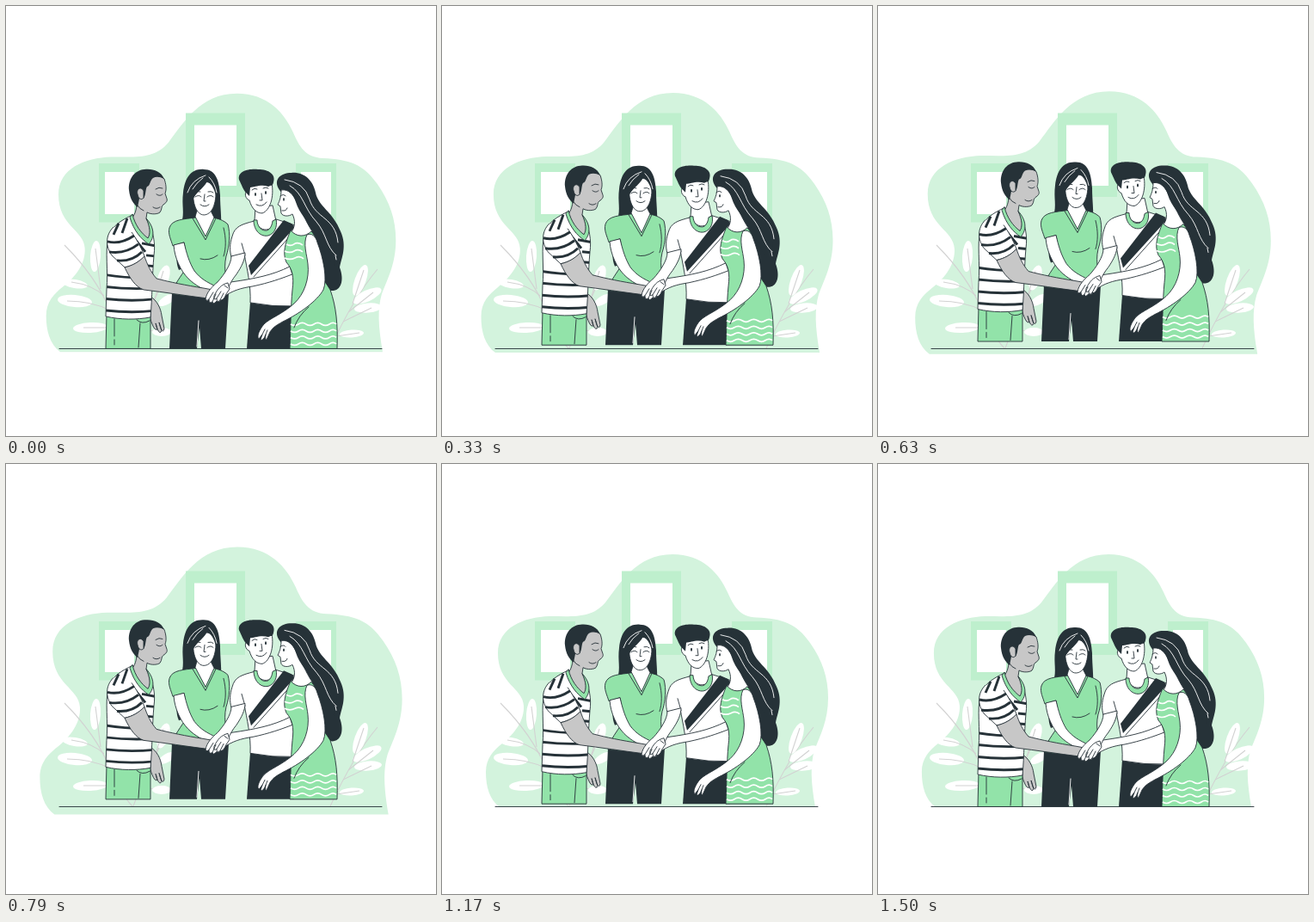
An HTML page that plays this animation: 500 px wide and 500 px high, repeating every 1.54 s.

```html
<!DOCTYPE html>
<html lang="en">
<head>
<meta charset="utf-8">
<title>Team hands together</title>
<style>
  html, body { margin: 0; height: 100%; overflow: hidden; background: #fff; }
  svg { display: block; width: 100vw; height: 100vh; }
  .line { fill: none; stroke: #263238; stroke-width: .9; stroke-linecap: round; stroke-linejoin: round; }
  .ink { fill: #263238; }
  .green { fill: #92e3a9; }
  .skin { fill: #fff; }
  .grey { fill: #c7c7c7; }
  .green, .skin, .grey { stroke: #263238; stroke-width: .9; stroke-linejoin: round; }
  .shine { fill: none; stroke: #fff; stroke-width: .9; stroke-linecap: round; }
  .wave { fill: none; stroke: #fff; stroke-width: 1.7; }
  .stripe { fill: none; stroke: #263238; stroke-width: 2.9; }
  .stem { fill: none; stroke: #d2d2d2; stroke-width: 1.1; }
</style>
</head>
<body>
<svg viewBox="0 0 500 500">
  <defs>
    <clipPath id="shirt"><path id="torso" d="M147 243C135 249 123 255 119 269C115 285 119 308 117 330L116 361C133 365 152 365 168 362C170 340 170 312 172 290C174 276 171 262 166 254Z"/></clipPath>
    <path id="ripple" d="M331 0q4.500 3 9 0t9 0t9 0t9 0t9 0t8 0"/>
  </defs>

  <path id="blob" fill="#d3f3dd" d="M67 399C55 390 51 375 51 358C51 342 60 333 70 325C85 313 96 298 95 281C94 260 65 256 65 220C65 190 95 178 125 177C152 177 174 180 190 161C207 139 226 105 268 105C303 105 322 127 332 149C339 165 346 178 366 178.500C396 180 412 185 428 208C442 228 449 248 449 272C449 298 440 315 433 333C428 350 429 370 434 399Z"/>

  <g fill="#fff">
    <path fill="#beefcd" d="M209 124.500H278V222H209ZM108 183H155V251.500H108ZM337 183H384V251.500H337Z"/>
    <path d="M219 138.500H268V209H219ZM115 193H149V242H115ZM343 193H378V242H343Z"/>
  </g>

  <g id="plants">
    <path class="stem" d="M68 278C92 302 109 325 121 354C130 374 139 390 147 398M148 398C157 372 170 350 183 318M158 376L182 379M432 306C411 331 394 361 377 398"/>
    <g fill="#fff">
      <ellipse cx="104" cy="291" rx="6" ry="18" transform="rotate(4 104 291)"/>
      <ellipse cx="126" cy="306" rx="5.500" ry="17" transform="rotate(13 126 306)"/>
      <ellipse cx="80" cy="323" rx="15" ry="5" transform="rotate(10 80 323)"/>
      <ellipse cx="80" cy="343" rx="20" ry="7" transform="rotate(5 80 343)"/>
      <ellipse cx="98" cy="374" rx="20" ry="6" transform="rotate(-3 98 374)"/>
      <ellipse cx="183" cy="316" rx="6.500" ry="15" transform="rotate(18 183 316)"/>
      <ellipse cx="187" cy="342" rx="11" ry="5" transform="rotate(-30 187 342)"/>
      <ellipse cx="181" cy="379" rx="11" ry="5"/>
      <ellipse cx="412" cy="319" rx="6.500" ry="19" transform="rotate(20 412 319)"/>
      <ellipse cx="420" cy="337" rx="18" ry="6.500" transform="rotate(-25 420 337)"/>
      <ellipse cx="421" cy="351" rx="16" ry="5.500" transform="rotate(-5 421 351)"/>
      <ellipse cx="402" cy="381" rx="14" ry="4.500" transform="rotate(-4 402 381)"/>
    </g>
    <path class="stem" d="M104 282L110 329M126 296L119 349M76 321Q100 324 114 337M71 343Q100 343 121 354M90 374L131 374M183 308L170 350M416 307L403 346M427 333L398 356M425 351L392 367M411 380L384 384"/>
  </g>

  <path class="line" d="M62 398.500H437"/>

  <g id="people">
    <g id="woman-centre">
      <path class="ink" d="M230 190C215 189 208 200 206 217C204 232 208 240 204 253C204 275 194 290 201 307L213 302L250 262C251 245 249 235 249 220C248 203 244 190 230 190Z"/>
      <path class="ink" d="M193 333L190 398.500H222L225 374L227 398.500H255L259 333Z"/>
      <path class="shine" d="M224 366L222 396"/>
      <path class="green" d="M221 246C207 248 193 248 190 258C188 265 192 272 194 279L207 275C210 288 209 298 208 307C200 319 194 327 193 335Q225 340 258 335C258 320 252 308 256 291C260 279 261 265 258 254C253 249 246 247 240 246Z"/>
      <path class="skin" d="M220 245L232 268L242 246L238 238H222Z"/>
      <path class="line" d="M217 247L232 272L244 247M253 258C256 270 256 282 253 291M246 290Q236 297 226 294"/>
      <path class="skin" d="M218 212C216 230 222 243 230 243C239 243 245 231 244 212C240 202 222 202 218 212Z"/>
      <path class="ink" d="M245 229C244 213 239 207 234 204C228 214 221 216 217 226C211 209 219 193 231 193C243 193 250 210 245 229Z"/>
      <path class="shine" d="M232 197Q216 202 211 217M229 200Q221 206 217 213M236 199Q243 206 245 217"/>
      <path class="line" d="M220 222q4-3 7 0M234 222q4-3 7 0M231 219L230 227H232M226 231q5 4 10 0M220 217q4-2 6-1M235 216q4-1 6 1"/>
      <path class="skin" d="M195 278C196 293 203 308 212 317C220 325 230 330 240 334L246 327C233 321 226 317 219 308C213 298 210 288 207 275Z"/>
    </g>

    <g id="man-right">
      <path class="ink" d="M284 344L280 398.500H335L336 347Z"/>
      <path class="skin" d="M289 250C274 254 266 256 263 268C260 277 260 284 262 292L277 288C280 305 285 325 284 345Q310 350 336 349V255L314 248Z"/>
      <path class="ink" d="M323 249L332 253L336 257L285 313L282 302Z"/>
      <path class="line" d="M338 259L288 315M274 276L278 290"/>
      <path class="skin" d="M290 234L289 250C296 264 309 263 314 250L310 232Z"/>
      <path class="green" d="M288 249C288 262 297 269 305 267C312 265 316 257 314 248L310 250C309 258 305 262 301 261C296 261 292 255 292 249Z"/>
      <path class="skin" d="M282 215C277 214 277 224 283 226C286 236 291 241 298 241C307 238 312 222 309 206L285 204Z"/>
      <path class="ink" d="M271 202C269 192 282 189 293 190C306 190 314 196 311 205C310 210 308 208 305 210C297 207 288 211 284 211L283 221L279 217C276 214 274 208 271 202Z"/>
      <path class="line" d="M286 214q3-3 6-1M299 212q3-2 6 0M297 218L298 226H295M291 231Q298 235 303 228"/>
      <ellipse class="ink" cx="290" cy="219" rx="1" ry="2"/>
      <ellipse class="ink" cx="302" cy="217" rx="1" ry="2"/>
    </g>

    <g id="woman-right">
      <path class="ink" d="M318 214C310 202 319 194 332 194C347 193 357 203 360 217C363 233 380 239 389 262C397 280 390 293 388 304C394 320 389 332 378 331C369 330 366 315 360 300C350 280 350 260 338 240Z"/>
      <path class="skin" d="M320 214C320 222 318 227 316 231L319 233L320 241C322 245 329 245 333 242C337 250 336 258 331 264C338 275 352 273 356 262C348 250 345 240 339 230C334 219 329 213 320 214Z"/>
      <path class="ink" d="M317 212C322 208 333 214 337 228C341 241 351 251 359 261C366 275 369 288 382 302L386 270L357 225L346 203L326 196Z"/>
      <path class="shine" d="M324 202Q347 205 353 225C360 248 383 245 386 275M330 209C346 218 346 235 361 251C373 265 372 280 384 290M383 290L384 295"/>
      <path class="line" d="M319 221q4-3 6 0M321 238Q326 239 327 235"/>
      <ellipse class="ink" cx="323" cy="225" rx=".9" ry="1.800"/>
      <path class="skin" d="M330 303C310 313 290 317 262 321C250 324 245 330 240 339C243 344 248 344 252 339C263 331 273 328 287 326C306 322 320 317 333 312Z"/>
      <path class="green" d="M331 261C325 275 321 287 326 298C333 306 335 315 333 330C331 350 331 375 330 398.500H385C386 370 384 350 377 330C370 318 360 310 362 295C364 280 362 270 355 262C348 269 338 269 331 261Z"/>
      <path class="wave" d="M326 277q5 3 9 0t10 1M324 285q6 3 11 0t10 1M324 293q6 3 12 0t10 1"/>
      <use class="wave" href="#ripple" y="370"/>
      <use class="wave" href="#ripple" y="378"/>
      <use class="wave" href="#ripple" y="385.500"/>
      <use class="wave" href="#ripple" y="393"/>
      <path class="skin" d="M350 266C345 276 350 290 351 300C353 317 347 335 335 346C322 358 307 363 300 370C295 376 291 384 294 387L298 382L296 388Q299 390 302 382Q301 389 303 388L307 379C311 373 315 371 322 367C341 358 362 343 369 330C374 318 369 293 362 275C360 267 355 264 350 266Z"/>
      <path class="line" d="M298 382L301 376M302 382L304 377M335 374Q340 360 352 350"/>
    </g>

    <g id="man-left">
      <path class="grey" d="M168 338C175 342 180 351 181 360L184 375Q183 381 180 375L178 368L181 378Q179 382 176 376L174 369L176 376Q173 378 170 370C166 362 167 350 168 338Z"/>
      <path class="green" d="M117 358L116 398.500H168V358Z"/>
      <path class="line" d="M126 364V384M126 388V394M152 365Q158 371 167 366M156 369L154 397"/>
      <use class="skin" href="#torso"/>
      <g clip-path="url(#shirt)" class="stripe">
        <path d="M148 269l14 17M158 276l16 3M163 290l10 1M164 302l12 1M112 312q28 5 60 4M112 326q30 4 60 2M112 340q30 4 60 1M112 353.500q30 4 60 1"/>
      </g>
      <path class="skin" d="M125 257C115 267 116 280 123 290L138 304C147 302 155 298 161 291C157 280 151 270 146 263"/>
      <path class="stripe" d="M141 247L135 264M131 253L125 266M118 274C130 277 140 273 149 267M120 286C133 288 145 284 154 277M129 296C141 297 151 293 158 286"/>
      <path class="grey" d="M152 213V232C151 240 149 243 147 246C151 258 158 267 165 272C169 265 168 256 163 247L164 240C169 243 177 242 179 240C182 236 180 233 183 231C186 229 188 227 187 224L185 218C187 213 186 207 184 201C174 194 160 195 152 213Z"/>
      <path class="ink" d="M184 201C180 192 171 189 161 190C148 191 142 203 143 214C144 224 148 230 153 234L155 224L160 224C163 219 162 213 164 210C168 209 167 203 171 200C175 198 180 199 184 201Z"/>
      <path class="grey" stroke="none" d="M160 215C157 209 151 213 153 219C154 225 158 226 160 223Z"/>
      <path class="line" d="M175 219q4 3 7 0M174 213q4-3 8-1M171 234Q175 237 179 234M153 232Q155 236 160 238"/>
      <path class="green" d="M147 242L144 246C149 262 157 271 166 277C173 269 173 258 163 247C168 258 168 265 165 270C157 264 150 255 147 242Z"/>
      <path class="grey" d="M138 304C144 317 151 327 160 330C185 333 210 337 234 340L246 337L240 330L229 328C210 325 190 321 175 317C168 309 164 300 161 291C154 298 147 302 138 304Z"/>
    </g>

    <g id="hands">
      <path class="skin" d="M262 291C262 300 254 312 246 321C240 326 233 333 232 341Q234 344 236 341Q236 347 240 344Q241 348 245 343Q248 346 251 340C258 333 258 324 268 312C274 303 278 295 278 287Z"/>
      <path class="skin" d="M258 322C250 324 246 329 242 337Q241 343 245 340Q245 346 249 342Q253 343 256 335L260 329Z"/>
      <path class="line" d="M236 341L241 333M240 344L244 335M245 340L250 332M249 342L253 334M254 325L258 328"/>
    </g>
  </g>
</svg>
<script>
  const LOOP = 1540;
  const blob = document.getElementById('blob');
  const people = document.getElementById('people');
  const pulse = [[-40, 1], [150, 1.1], [400, 1], [570, 1], [710, 1.09], [940, 1], [1500, 1], [1690, 1.1]];

  function scaleAt(t) {
    const i = pulse.findIndex(([time]) => time > t);
    const [t0, s0] = pulse[i - 1], [t1, s1] = pulse[i];
    return s0 + (s1 - s0) * (t - t0) / (t1 - t0);
  }

  function draw() {
    const t = performance.now() % LOOP;
    const lift = 4.4 * (1 - Math.cos(2 * Math.PI * (t + 45) / LOOP));
    blob.setAttribute('transform', `translate(250 252) scale(${scaleAt(t)}) translate(-250 -252)`);
    people.setAttribute('transform', `translate(0 ${-lift})`);
    requestAnimationFrame(draw);
  }
  draw();
</script>
</body>
</html>
```
